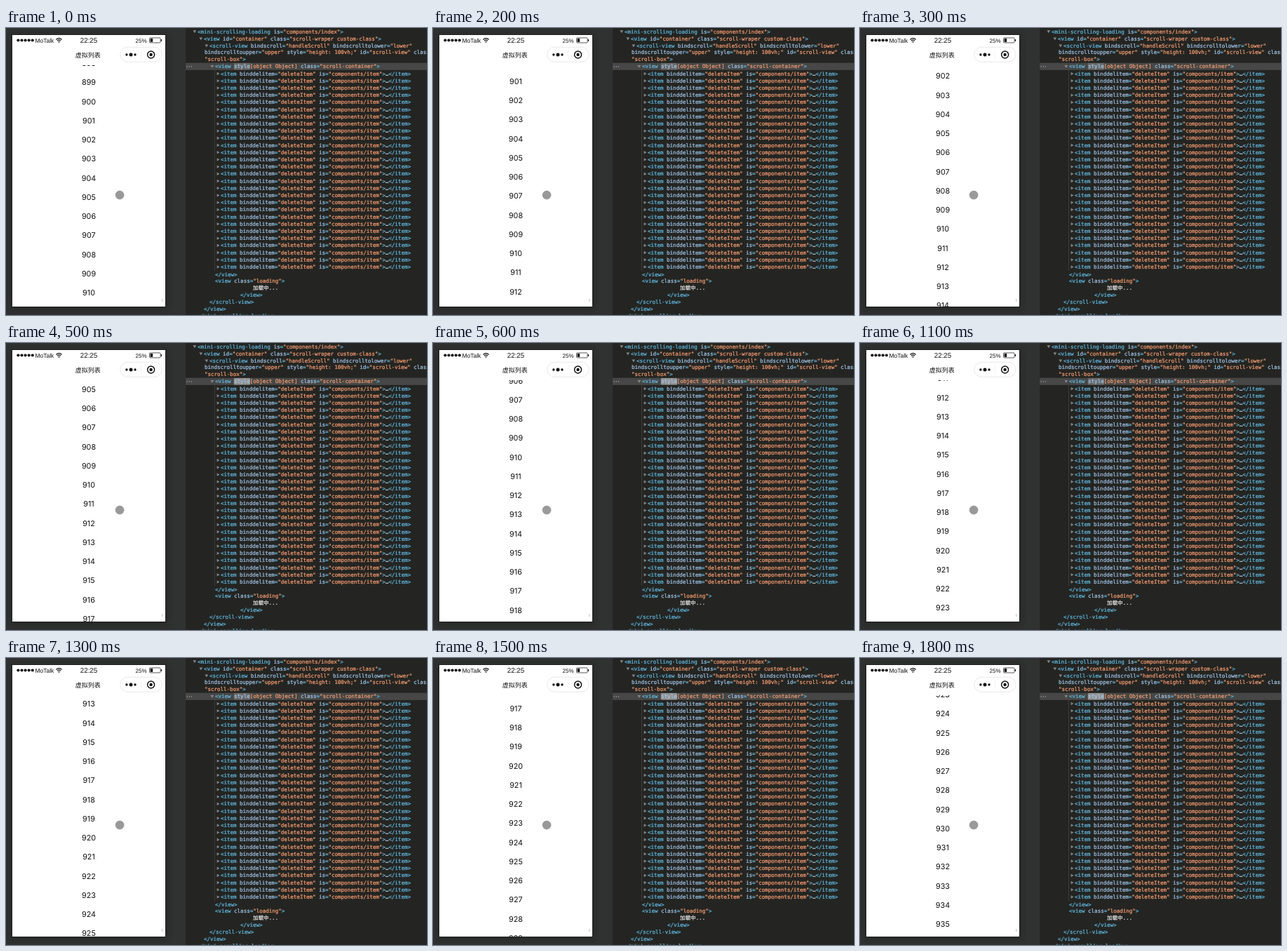
Animation, 600 px wide and 409 px high, one loop 1.9 s. Source, as an HTML page:

```html
<!DOCTYPE html>
<html lang="zh">
<head>
<meta charset="utf-8">
<style>
html, body { margin: 0; width: 100%; height: 100%; overflow: hidden; background: #242522; }
svg { display: block; text-rendering: geometricPrecision; }
.code { font: 7.5px "DejaVu Sans Mono", "Noto Sans CJK SC", monospace; }
.code text { white-space: pre; stroke-width: .22px; }
.tag { fill: #61b8e0; stroke: #61b8e0; }
.name { fill: #a3c5e8; stroke: #a3c5e8; }
.value { fill: #f79d72; stroke: #f79d72; }
.plain { fill: #e2e2e2; stroke: #e2e2e2; }
.arrow { fill: #858585; }
.list { font: 10.8px Inter, sans-serif; text-anchor: middle; fill: #111; }
.bar { font-family: "Liberation Sans", Arial, sans-serif; fill: #111; }
</style>
</head>
<body>
<svg id="stage" width="600" height="409" viewBox="0 0 600 409">
  <defs>
    <clipPath id="page"><rect x="9" y="53" width="218" height="344"/></clipPath>
    <filter id="soft" x="-10%" y="-10%" width="120%" height="120%"><feGaussianBlur stdDeviation="4"/></filter>
  </defs>

  <rect width="256" height="409" fill="#303131"/>
  <rect x="7" y="11" width="222" height="389" fill="#1d1d1d" opacity=".6" filter="url(#soft)"/>
  <rect x="8.5" y="9.5" width="219" height="388" fill="#fff" stroke="#1e1e1e"/>

  <g class="list" id="list" clip-path="url(#page)"></g>
  <path d="M222.8 386v4" stroke="#bbb"/>
  <circle cx="162.1" cy="238.1" r="6" fill="#999" stroke="#8a8a8a" stroke-width=".6"/>

  <g class="bar">
    <g id="signal"></g>
    <text x="41.4" y="20.6" font-size="8.5">MoTalk</text>
    <path d="M71.4 16.4Q75.5 12.8 79.6 16.4M73 18.3Q75.5 16 78 18.3" fill="none" stroke="#111" stroke-width="1.3"/>
    <path d="M74.1 19.5Q75.5 18.3 76.9 19.5L75.5 21Z"/>
    <text x="118" y="20.8" font-size="9.8" text-anchor="middle">22:25</text>
    <text x="184.6" y="20.9" font-size="8">25%</text>
    <rect x="204.5" y="14" width="15.6" height="7" rx="1.2" fill="none" stroke="#111" stroke-width=".7"/>
    <rect x="205.6" y="15.1" width="3.6" height="4.8"/>
    <rect x="220.8" y="16" width="1.3" height="3" rx=".6"/>
    <text x="116.8" y="42.3" font-size="9" text-anchor="middle" font-family="Noto Sans CJK SC, sans-serif">虚拟列表</text>
    <rect x="162.8" y="27.3" width="59.4" height="21" rx="10.5" fill="#fff" stroke="#e2e2e2" stroke-width=".8"/>
    <path d="M192.5 32v12" stroke="#eee" stroke-width=".7"/>
    <circle cx="171.9" cy="38" r="1.7"/><circle cx="178" cy="38" r="2.5"/><circle cx="184" cy="38" r="1.7"/>
    <circle cx="206.6" cy="38" r="5" fill="none" stroke="#111" stroke-width="1.5"/>
    <circle cx="206.6" cy="38" r="2.2"/>
  </g>

  <rect x="256" y="49.7" width="344" height="10.2" fill="#464746"/>
  <path d="M297.5 60v286" stroke="#3a3c3b"/>
  <rect id="flash" x="324.8" y="50" width="23.2" height="9.6" rx="1"/>
  <g class="code" id="code"></g>
</svg>
<script>
const NS = 'http://www.w3.org/2000/svg';
const $ = id => document.getElementById(id);

function add(parent, tag, attrs = {}, text = '') {
  const el = document.createElementNS(NS, tag);
  for (const key in attrs) el.setAttribute(key, attrs[key]);
  el.textContent = text;
  return parent.appendChild(el);
}

// Code panel
const code = $('code');
const TOKEN = /<\/?[\w-]+|"[^"]*"|\[.*?\]|[\w-]+(?=[=\[])|[^]/g;

function kind(token) {
  if (/^["[]/.test(token)) return 'value';
  if (/^\w/.test(token)) return 'name';
  return token === '…' ? 'plain' : 'tag';
}

function line(x, mid, src, arrow) {
  const text = add(code, 'text', { x, y: mid + 2.6 });
  for (const token of src.match(TOKEN)) add(text, 'tspan', { class: kind(token) }, token);
  if (!arrow) return;
  const d = arrow === 'open'
    ? `M${x - 6.6} ${mid - 1.8}h4.8l-2.4 4z`
    : `M${x - 5.4} ${mid - 2.2}v4.6l3.8 -2.3z`;
  add(code, 'path', { d, class: 'arrow' });
}

line(273, 5, '<mini-scrolling-loading is="components/index">', 'open');
line(282, 15.2, '<view id="container" class="scroll-wraper custom-class">', 'open');
line(290, 25.2, '<scroll-view bindscroll="handleScroll" bindscrolltolower="lower"', 'open');
line(283, 34.6, 'bindscrolltoupper="upper" style="height: 100vh;" id="scroll-view" class=');
line(283, 44.3, '"scroll-box">');
line(298, 54.7, '<view style[object Object] class="scroll-container">', 'open');
for (let i = 0; i < 28; i++) {
  line(306, 65 + i * 10.2, '<item binddelitem="deleteItem" is="components/item">…</item>', 'shut');
}
line(298, 351, '</view>');
line(298, 360.8, '<view class="loading">');
add(code, 'text', { x: 352, y: 373.2, class: 'plain' }, '加载中...');
line(334, 380, '</view>');
line(290, 390, '</scroll-view>');
line(282, 400, '</view>');
line(273, 410, '</mini-scrolling-loading>');
for (let i = 0; i < 3; i++) add(code, 'circle', { cx: 258.2 + i * 3.1, cy: 55, r: .7, fill: '#aaa' });

// Phone
for (let i = 0; i < 5; i++) add($('signal'), 'circle', { cx: 17.4 + i * 5.1, cy: 17.5, r: 2.1 });
const rows = Array.from({ length: 15 }, () => add($('list'), 'text', { x: 118 }));

// Scroll offset for each step
const STEP = 100, PITCH = 27.25;
const SCROLL = [0, 26, 56, 90.8, 132, 175, 214.5, 250, 283, 311.2,
  335, 354, 372, 393.5, 438, 496, 557, 619, 679.3];

function draw(now) {
  const step = Math.floor(now / STEP) % SCROLL.length;
  const scroll = SCROLL[step];
  const first = 897 + Math.floor(scroll / PITCH);
  const last = step < 10 ? 920 : 948; // rows loaded so far
  rows.forEach((row, i) => {
    const n = first + i;
    row.textContent = n <= last ? n : '';
    row.setAttribute('y', 81.4 + (n - 899) * PITCH - scroll);
  });
  const bright = (step >= 5 && step < 10) || step >= 14;
  $('flash').setAttribute('fill', bright ? '#929292' : '#686868');
}

const start = performance.now();
function tick() {
  draw(performance.now() - start);
  requestAnimationFrame(tick);
}
tick();
</script>
</body>
</html>
```
